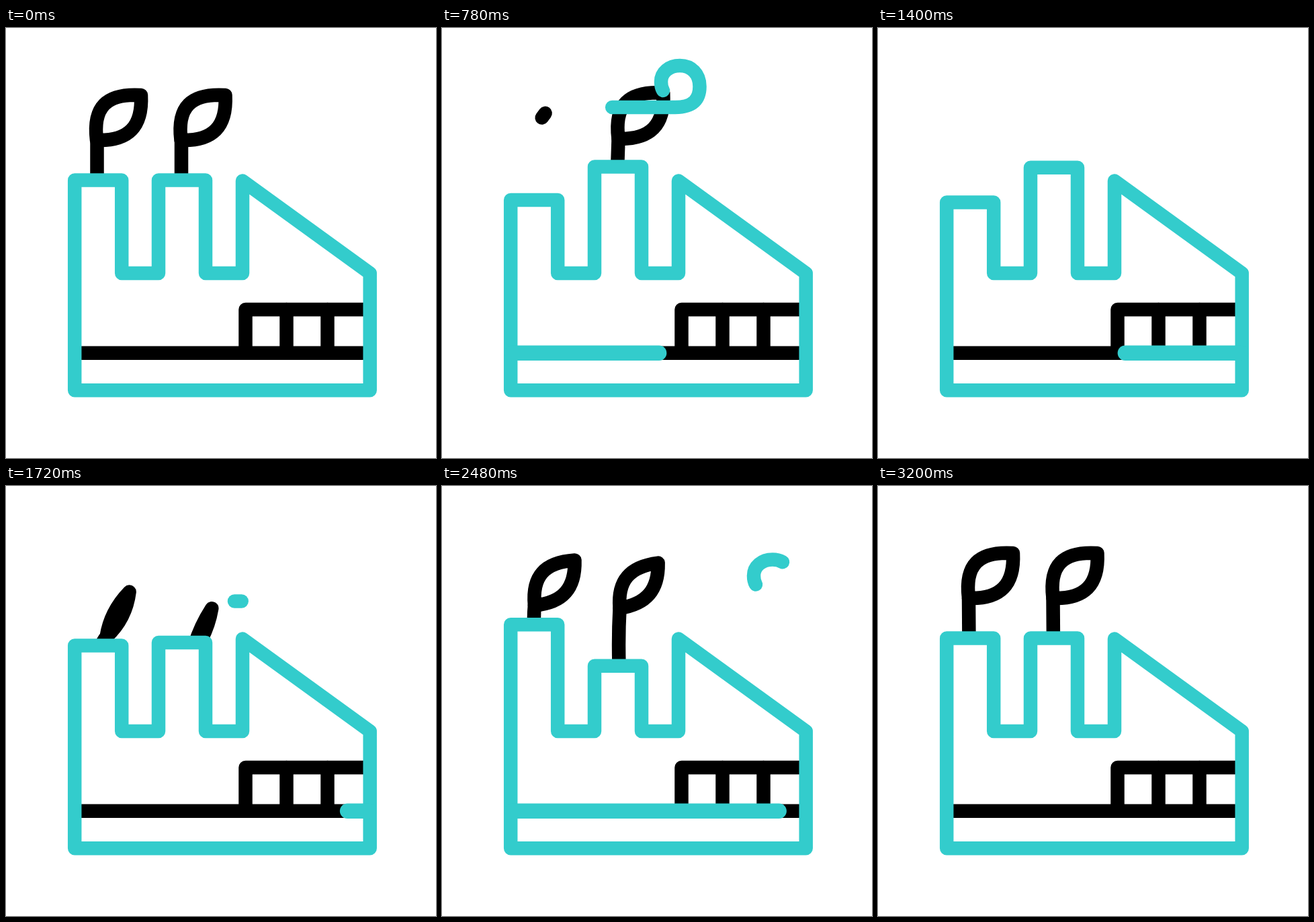
Write an HTML page with a canvas that moves like this. It is 640x640 px and loops after 3600 ms.

```html
<!DOCTYPE html>
<html lang="en">
<head>
<meta charset="utf-8">
<title>Green factory</title>
<style>
html, body { margin: 0; width: 100%; height: 100%; overflow: hidden; background: #fff; }
canvas { display: block; width: 640px; height: 640px; }
</style>
</head>
<body>
<canvas id="stage" width="640" height="640"></canvas>
<script>
const ctx = document.getElementById('stage').getContext('2d');
const LOOP = 3600, TEAL = '#33cccc', BLACK = '#000', WIDTH = 20.5;

const ramp = (t, from, to) => Math.max(0, Math.min(1, (t - from) / (to - from)));
const smooth = u => u * u * (3 - 2 * u);
const ease = (t, from, to) => smooth(ramp(t, from, to));
const mix = (a, b, u) => a + (b - a) * u;

function stroke(color, width = WIDTH) {
  ctx.strokeStyle = color;
  ctx.lineWidth = width;
  ctx.stroke();
}

function line(points, color, width) {
  ctx.beginPath();
  points.forEach(p => ctx.lineTo(...p));
  stroke(color, width);
}

// Two mirrored curves between base and tip; the bulges are relative to the length
function drawLeaf(tx, ty, bx, by, left, right) {
  const dx = tx - bx, dy = ty - by;
  const at = (a, n) => [bx + a * dx + n * dy, by + a * dy - n * dx];
  ctx.beginPath();
  ctx.moveTo(bx, by);
  ctx.bezierCurveTo(...at(.33, left), ...at(.64, left), tx, ty);
  ctx.bezierCurveTo(...at(.66, -right), ...at(.34, -right), bx, by);
  ctx.closePath();
  stroke(BLACK);
}

function drawStem(x1, y1, x0, y0, bend) {
  ctx.beginPath();
  ctx.moveTo(x1, y1);
  ctx.quadraticCurveTo((x0 + x1) / 2 + bend, (y0 + y1) / 2, x0, y0);
  stroke(BLACK);
}

// The leaf tears off and shrinks away up and to the right, its stem after it
function blowAway(t) {
  const u = ramp(t, 120, 720), v = ramp(t, 120, 840);
  if (u < 1) {
    const tip = u ** 1.7, base = u ** 2.6, size = 1 - u ** 4;
    drawLeaf(mix(201, 238, tip), mix(100, 53, tip),
      mix(135, 238, base), mix(167, 53, base), .415 * size, .37 * size);
  }
  if (v < 1) {
    const top = smooth(v);
    drawStem(mix(135.5, 154, top), mix(167, 126, top),
      mix(135.5, 154, v ** 4), mix(240, 126, v ** .8), 0);
  }
}

// A thin shoot rises fast, then slowly opens and settles
function sprout(t, cap) {
  const rest = (1 - ramp(t, 1480, 3100)) ** 2;
  const drop = 72 * rest + 110 * Math.exp((1480 - t) / 80) * (rest > 0);
  const bx = 135 + 20 * rest, by = 167 + drop;
  drawLeaf(201 - 24 * rest, 100 + drop, bx, by, .415 - .42 * rest, .37 - .34 * rest);
  if (by < cap + 8) drawStem(bx, by, 135.5 + 14 * rest, cap + 8, -11 * rest);
}

function drawPlant(t, x, cap, outLag, inLag) {
  ctx.save();
  ctx.beginPath();
  ctx.rect(0, 0, 640, cap);
  ctx.clip();
  ctx.translate(x, 0);
  if (t - inLag > 1480) sprout(t - inLag, cap);
  else blowAway(t - outLag);
  ctx.restore();
}

const WIND = 'M202 118H347C374 118 383.5 106 383.5 87C383.5 68 371 56 354 56' +
  'C338 56 326 66 326 80Q326 88 329 93';
const windPath = new Path2D(WIND);
const probe = document.createElementNS('http://www.w3.org/2000/svg', 'path');
probe.setAttribute('d', WIND);
const windLength = probe.getTotalLength();

function drawWind(x, y, start, end) {
  if (end - start < .002) return;
  ctx.save();
  ctx.translate(x, y);
  ctx.setLineDash([(end - start) * windLength, 2000]);
  ctx.lineDashOffset = -start * windLength;
  ctx.strokeStyle = TEAL;
  ctx.lineWidth = WIDTH;
  ctx.stroke(windPath);
  ctx.restore();
}

function drawWindows() {
  line([[112, 483.75], [536, 483.75]], BLACK);
  line([[356.5, 480], [356.5, 419], [536, 419]], BLACK);
  for (const x of [417.5, 478.5]) line([[x, 419], [x, 480]], BLACK);
}

function drawWalls(cap1, cap2) {
  ctx.beginPath();
  ctx.moveTo(102.2, 539.3);
  for (const [x, y] of [[541.7, 539.3], [541.7, 365], [352, 227.5], [352, 365],
    [297, 365], [297, cap2], [227, cap2], [227, 365],
    [172.2, 365], [172.2, cap1], [102.2, cap1]]) ctx.lineTo(x, y);
  ctx.closePath();
  stroke(TEAL);
}

function capHeight(t, first, second) {
  const a = mix(226.4, first, ease(t, 120, 1130));
  const b = mix(a, second, ease(t, 1130, 2350));
  return mix(b, 226.4, ease(t, 2350, 3200));
}

function drawFloor(t) {
  const start = ease(t, 1110, 1620) - ease(t, 1625, 2205);
  const end = ease(t, 490, 1070) - ease(t, 2375, 2955);
  if (end - start < .002) return;
  line([start, end].map(u => [mix(104, 540, u), 483.7]), TEAL, 22.5);
}

function draw(t) {
  ctx.fillStyle = '#fff';
  ctx.fillRect(0, 0, 640, 640);
  ctx.lineCap = ctx.lineJoin = 'round';
  const cap1 = capHeight(t, 267.3, 205), cap2 = capHeight(t, 198.8, 270.5);
  drawPlant(t, 0, cap1, 0, 0);
  drawPlant(t, 125.5, cap2, 530, 110);
  drawWindows();
  drawWalls(cap1, cap2);
  drawFloor(t);
  drawWind(0, 0, ease(t, 640, 1180), ease(t, 175, 755));
  drawWind(138, 53.5, ease(t, 2110, 2650), ease(t, 1655, 2240));
}

function tick() {
  draw(performance.now() % LOOP);
  requestAnimationFrame(tick);
}
tick();
</script>
</body>
</html>
```
